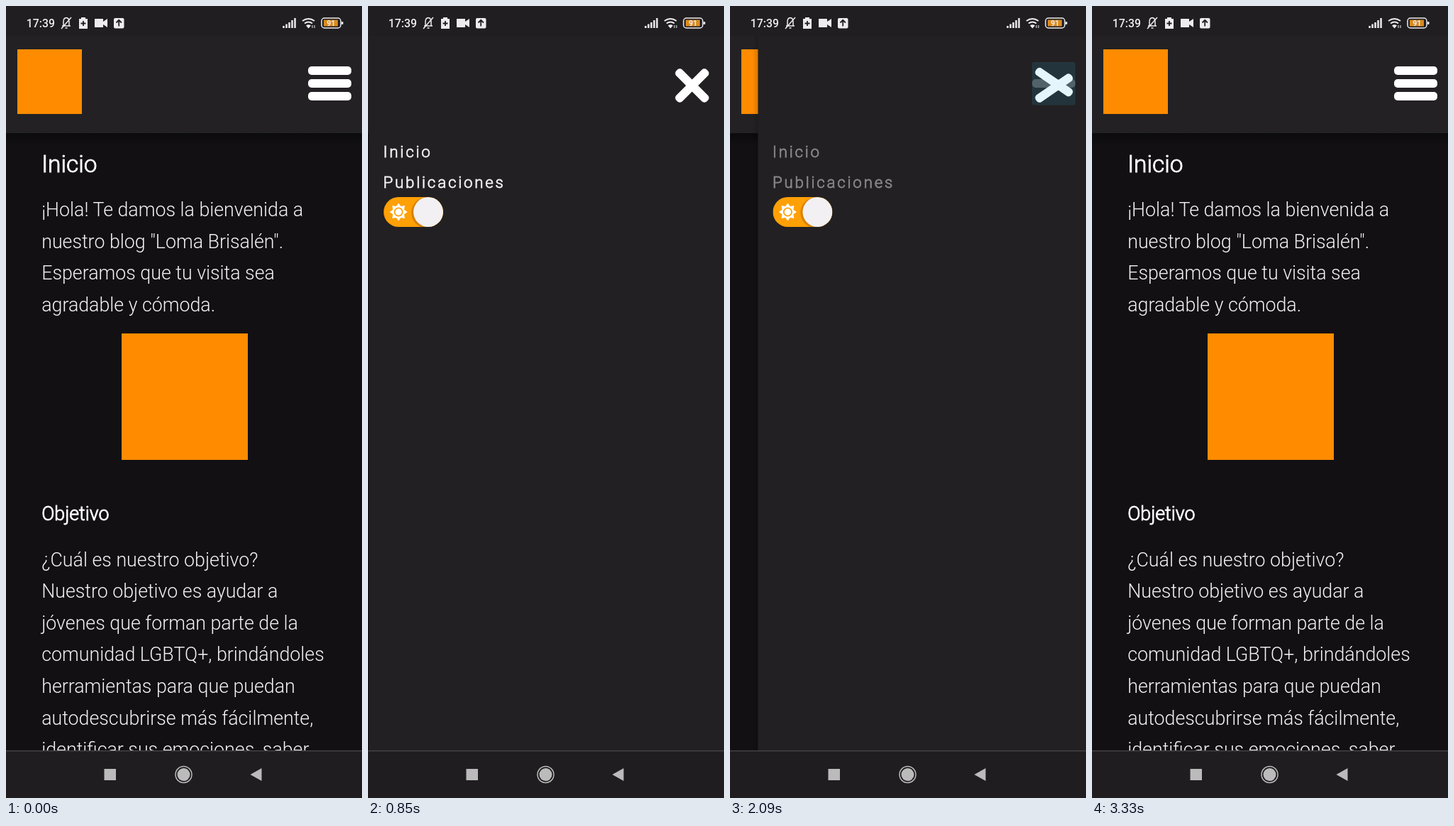
An HTML page that plays this animation: 502x1115 px, repeating every 3510 ms.

```html
<!DOCTYPE html>
<html lang="es">
<head>
<meta charset="utf-8">
<title>Menú lateral</title>
<style>
  html, body { margin: 0; width: 100%; height: 100%; overflow: hidden; background: #121013; }
  svg { display: block; width: 502px; height: 1115px; font-family: Roboto, sans-serif; }
  .copy { font-size: 26.77px; font-weight: 300; fill: #f4f2f5; }
  .title { font-weight: 300; fill: #fff; stroke: #fff; stroke-width: .9px; }
  .link { font-size: 22.3px; font-weight: 300; letter-spacing: 2.79px; fill: #f4f2f5; stroke: #f4f2f5; stroke-width: .8px; }
</style>
</head>
<body>
<svg viewBox="0 0 502 1115">
  <defs>
    <linearGradient id="below" x2="0" y2="1">
      <stop stop-color="#000" stop-opacity=".4"/><stop offset="1" stop-color="#000" stop-opacity="0"/>
    </linearGradient>
    <linearGradient id="beside">
      <stop stop-color="#000" stop-opacity="0"/><stop offset="1" stop-color="#000" stop-opacity=".15"/>
    </linearGradient>
    <clipPath id="iconBox"><rect x="426" y="79" width="61" height="61"/></clipPath>
    <clipPath id="pill"><rect x="21" y="269" width="84" height="42" rx="21"/></clipPath>
  </defs>

  <rect width="502" height="1115" fill="#121013"/>
  <g id="page">
    <rect y="42" width="502" height="137" fill="#232123"/>
    <rect y="179" width="502" height="18" fill="url(#below)"/>
    <rect x="16" y="61" width="91" height="91" fill="#ff8c00"/>
    <rect x="163" y="461" width="178" height="178" fill="#ff8c00"/>
    <text class="title" x="50.2" y="234" font-size="33.5">Inicio</text>
    <text class="title" x="50.2" y="723.5" font-size="26.77">Objetivo</text>
  </g>

  <g id="panel">
    <rect x="-8" y="42" width="8" height="1006" fill="url(#beside)"/>
    <rect y="42" width="502" height="1006" fill="#222022"/>
    <g id="links">
      <text class="link" x="20.5" y="213">Inicio</text>
      <text class="link" x="20.5" y="256">Publicaciones</text>
    </g>
    <g clip-path="url(#pill)">
      <rect x="21" y="269" width="84" height="42" fill="#ffa005"/>
      <circle cx="82" cy="291" r="22" fill="#a85c00" opacity=".45"/>
      <circle cx="84" cy="290" r="21" fill="#f2f0f2"/>
    </g>
    <path id="sun" fill="#fff"/>
    <circle cx="42" cy="290" r="5.6" fill="#fff" stroke="#ffa005" stroke-width="1.8"/>
  </g>

  <g clip-path="url(#iconBox)">
    <g fill="#fff">
      <rect id="top" x="-30.5" y="-6" width="61" height="12" rx="5"/>
      <rect id="middle" x="426" y="103" width="61" height="12" rx="5"/>
      <rect id="bottom" x="-30.5" y="-6" width="61" height="12" rx="5"/>
    </g>
    <rect id="tap" x="426" y="79" width="61" height="60.5" rx="2" fill="#33b5e5"/>
  </g>

  <!-- status bar -->
  <rect width="502" height="42" fill="#201e20"/>
  <g fill="#eeecee">
    <text x="28.8" y="30" font-size="15.8" font-weight="500">17:39</text>
    <g fill="none" stroke="#eeecee" stroke-width="1.5">
      <path d="M79 28h12M81 28v-6q0-5 4-5.500q4 .5 4 5.500v6M83.500 31h3M92 16L78 32"/>
      <path d="M418 21q8.500-6 17 0M421 24.500q5.500-4 11 0" stroke-width="2"/>
      <rect x="445" y="17" width="27" height="14" rx="4"/>
    </g>
    <path d="M106 16h6v2h3v14h-12v-14h3z"/>
    <path d="M109 21v7M105.500 24.500h7" stroke="#201e20" stroke-width="1.8"/>
    <path d="M125 18h12v4l6-4v12l-6-4v4h-12z"/>
    <rect x="152" y="17" width="14.500" height="14.500" rx="2"/>
    <path d="M159.200 28.500v-8M155.500 23.500l3.700-3.700l3.700 3.700" fill="none" stroke="#201e20" stroke-width="1.8"/>
    <path d="M391.500 31v-3M395.500 31v-5.500M399.500 31v-8M403.500 31v-11M407.500 31v-14" stroke="#eeecee" stroke-width="2.5"/>
    <path d="M423 27.500q3.500-2.500 7 0l-3.500 4z"/>
    <path d="M432 27v4M435 27v4" stroke="#eeecee"/>
    <rect x="473" y="22" width="2.500" height="4" rx="1"/>
    <rect x="448" y="19.500" width="20" height="9" fill="#d98a1f"/>
    <text x="458.200" y="28" font-size="10.500" font-weight="700" text-anchor="middle">91</text>
  </g>

  <!-- navigation bar -->
  <rect y="1048" width="502" height="67" fill="#1f1d1f"/>
  <rect y="1048" width="502" height="1.300" fill="#484648"/>
  <g fill="#bbb">
    <rect x="138.500" y="1074" width="16.500" height="16"/>
    <circle cx="250.500" cy="1082" r="9"/>
    <circle cx="250.500" cy="1082" r="11.500" fill="none" stroke="#bbb" stroke-width="1.500"/>
    <path d="M344.500 1082L360.500 1073V1091z"/>
  </g>
</svg>
<script>
const LOOP = 3510;
const $ = id => document.getElementById(id);
const clamp = v => Math.min(1, Math.max(0, v));
const mix = (a, b, p) => a + (b - a) * p;

function bezier(x1, y1, x2, y2) {
  const at = (a, b, s) => 3 * a * s * (1 - s) ** 2 + 3 * b * s * s * (1 - s) + s ** 3;
  return x => {
    let low = 0, high = 1;
    for (let i = 0; i < 24; i++) {
      const s = (low + high) / 2;
      if (at(x1, x2, s) < x) low = s; else high = s;
    }
    return x <= 0 ? 0 : x >= 1 ? 1 : at(y1, y2, low);
  };
}
const ease = bezier(.25, .1, .25, 1);
const easeInOut = bezier(.42, 0, .58, 1);

function addCopy(firstBaseline, lines) {
  lines.forEach((line, i) => {
    const text = document.createElementNS('http://www.w3.org/2000/svg', 'text');
    text.setAttribute('class', 'copy');
    text.setAttribute('x', 50.2);
    text.setAttribute('y', firstBaseline + i * 44.6);
    text.textContent = line;
    $('page').append(text);
  });
}
addCopy(296, [
  '¡Hola! Te damos la bienvenida a',
  'nuestro blog "Loma Brisalén".',
  'Esperamos que tu visita sea',
  'agradable y cómoda.'
]);
addCopy(788.5, [
  '¿Cuál es nuestro objetivo?',
  'Nuestro objetivo es ayudar a',
  'jóvenes que forman parte de la',
  'comunidad LGBTQ+, brindándoles',
  'herramientas para que puedan',
  'autodescubrirse más fácilmente,',
  'identificar sus emociones, saber'
]);

// Eight-pointed star behind the sun's disc
$('sun').setAttribute('d', 'M' + Array.from({ length: 16 }, (_, i) => {
  const r = i % 2 ? 8.6 : 12.6, a = i * Math.PI / 8;
  return [42 + r * Math.cos(a), 290 + r * Math.sin(a)];
}).join('L') + 'z');

function placeBar(id, y, angle, p) {
  $(id).setAttribute('transform',
    `translate(${mix(456.5, 457, p)} ${mix(y, 112, p)}) rotate(${angle * p})`);
}

const tapGlow = (t, start) => t < start ? 0 : .4 * (1 - clamp((t - start) / 180));

function draw(t) {
  const open = ease((t - 423) / 456) - easeInOut((t - 2018) / 372);
  const cross = ease((t - 390) / 300) - ease((t - 2039) / 300);
  const x = 502 * (1 - open);

  $('panel').setAttribute('transform', `translate(${x})`);
  $('panel').style.display = x < 501.5 ? '' : 'none';
  $('links').style.opacity = 1 - clamp((t - 2030) / 120);

  placeBar('top', 91, 45, cross);
  placeBar('bottom', 127, -45, cross);
  $('middle').style.opacity = 1 - cross;
  $('tap').style.opacity = tapGlow(t, 360) + tapGlow(t, 1970);
}

function tick() {
  draw(performance.now() % LOOP);
  requestAnimationFrame(tick);
}
tick();
</script>
</body>
</html>
```
